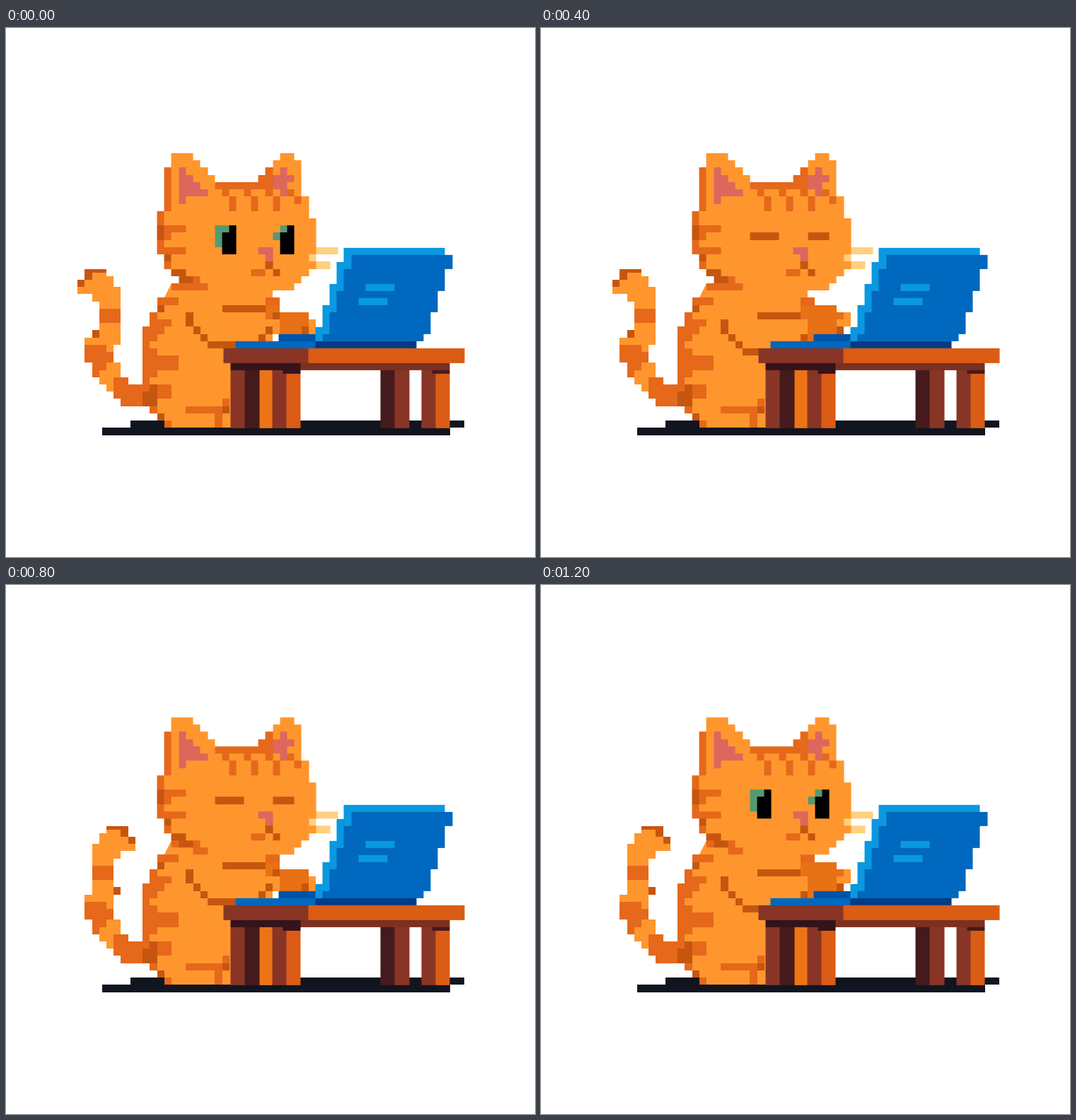
An HTML page that plays this animation: 748x748 px, repeating every 1.6 s.

```html
<!DOCTYPE html>
<html lang="en">
<head>
<meta charset="utf-8">
<title>Cat at a laptop</title>
<style>
  html, body { margin: 0; width: 100%; height: 100%; overflow: hidden; background: #fff; }
  svg { display: block; width: 100vw; height: 100vh; shape-rendering: crispEdges; }
  #tailLeft, #tailRight, #eyesOpen, #eyesShut, #armsUp, #armsDown {
    animation: show 1600ms step-end infinite;
  }
  #head { animation: nod 1600ms step-end infinite; }
  #tailRight { animation-delay: -800ms; }
  #eyesOpen { animation-delay: -400ms; }
  #eyesShut { animation-delay: -1200ms; }
  #armsUp, #armsDown { animation-duration: 800ms; }
  #armsDown { animation-delay: -400ms; }
  @keyframes show { 0% { visibility: visible } 50%, 100% { visibility: hidden } }
  @keyframes nod { 0% { transform: none } 50%, 100% { transform: translateY(1px) } }
</style>
</head>
<body>
<svg viewBox="0 0 748 748">
  <!-- one unit is one square cell of the drawing -->
  <g transform="translate(101.1 177) scale(10.22)">
    <g id="ground"></g>
    <g id="tail"></g>
    <g id="tailLeft"></g>
    <g id="tailRight" transform="translate(8) scale(-1 1)"></g>
    <g id="body"></g>
    <g id="armsUp"></g>
    <g id="armsDown"></g>
    <g id="head">
      <g id="face"></g>
      <g id="eyesOpen"></g>
      <g id="eyesShut"></g>
    </g>
    <g id="laptop" transform="translate(32.87 13.05)"></g>
    <g id="table" transform="translate(20.15 27)"></g>
  </g>
</svg>
<script>
const fur = '#ff962d', stripe = '#e5681b', dark = '#c6560f', paw = '#e87015',
      pink = '#dd675d', green = '#559972', whisker = '#ffd07f',
      blue = '#0068be', sky = '#0a98e0', deep = '#0054a8', navy = '#003c88',
      wood = '#db5c14', brown = '#883526', shade = '#451a1c', dusk = '#35131a';

function draw(id, fill, d) {
  const path = document.createElementNS('http://www.w3.org/2000/svg', 'path');
  path.setAttribute('d', d);
  path.setAttribute('fill', fill);
  document.getElementById(id).append(path);
}
const bar = (x, y, w, h = 1) => `M${x} ${y}h${w}v${h}h${-w}z`;
const steps = (step, n) => step.repeat(n);
const repeat = (n, make) => Array.from({ length: n }, (_, i) => make(i)).join('');

draw('ground', '#111520', bar(7.35, 37, 46.2) + bar(3.4, 38, 48.2));

// Tail: a fixed root and a tip that flips from side to side.
draw('tail', fur, `M1 25.5h4v3.5h1v2h1v1h3v3h-4${steps('v-1h-1', 4)}v-2h-1z`);
draw('tail', stripe, `M1 26.5h3v1h1v1.5${steps('h-1v1', 2)}h-1v-2h-1zM5 31h2v1h3v3h-4v-1h-1z`);
for (const tip of ['tailLeft', 'tailRight']) {
  draw(tip, fur, 'M1 16h3v1h1v1.5h1v8h-3v-6h-1v-1h-2v-2h1z');
  draw(tip, stripe, bar(3, 21.5, 3, 2));
  draw(tip, dark, 'M0 18.5v-1h1v-1.5h3v.5h-2v1h-1v1z' + bar(2, 24.5, 1));
}

// Body and its flank stripes.
draw('body', fur, `M13 18h14v2h1v2h-1v5h-5.8v11h-9.2${steps('v-1h-1', 2)}v-1h-1v-11h1v-2h1v-2h1z`);
draw('body', stripe, `M13 18h3v1h-3v1h1v1h-3v-1h2z${bar(10, 22, 1, 2)}M11 23h2v1h-1v1h-1v1h-1v1h1v1h3v2h-3v1h-1v1h-1v-8h2z
  M9 32h4v2h-2v2h-1v-1h-1z${bar(12, 37, 1)}M15 35h5v3h-1v-2h-4z${bar(20, 34, 1)}${bar(26, 20, 2)}`);
draw('body', dark, `${bar(11, 21, 1)}M10 32h1v3h-2v-2h1z${bar(11, 36, 1)}${bar(20, 35, 1)}`);

// Arms: the same creases, one cell lower on each keystroke.
const creases = y => `M15 ${y}h1v2${steps('h1v1', 2)}h4v1h-4${steps('v-1h-1', 3)}z${bar(20, y - 1, 6)}`;
const elbow = x => bar(x + 1, 24, 1) + bar(x, 25, 1);
draw('armsUp', fur, 'M25 22h2v1h1v2h-1v1h-2zM31 23h2v2h-2z');
draw('armsUp', paw, 'M26 21h2v1h4v2h-1v1h-3v-2h-2z');
draw('armsUp', dark, creases(22) + elbow(25) + bar(27, 22, 1) + bar(31, 24, 1));
draw('armsDown', fur, bar(25, 23, 2, 3) + bar(31, 22, 2, 2));
draw('armsDown', paw, 'M26 21h5v1h1v1h-1v2h-3v1h-1v-3h-1z');
draw('armsDown', dark, creases(23) + bar(26, 25, 1) + bar(31, 24, 1));

// Head.
draw('face', fur, `M13 0h3${steps('v1h1', 3)}v1h6${steps('v-1h1', 3)}v-1h2v1h1v5h1v3h1v7
  ${steps('h-1v1', 3)}H16v-1h-2${steps('v-1h-1', 2)}v-2h-1v-6h1v-6h1z`);
draw('face', stripe, `M19 4h6v-1h1v-1h1v3h-8z${bar(12, 2, 1, 6)}${bar(11, 8, 1, 6)}
  ${repeat(4, i => bar(20 + 3 * i, 5, 1))}${repeat(3, i => bar(21 + 3 * i, 6, 1, 2))}${bar(30, 6, 1)}
  ${bar(12, 10, 3)}${bar(12, 11, 1)}${bar(12, 13, 3)}${bar(12, 15, 1)}${bar(16, 17, 1)}${bar(16, 18, 2)}${bar(24, 16, 2)}`);
draw('face', dark, `${bar(11, 10, 1, 2)}${bar(12, 14, 1)}M13 16h2v1h1v1h-2v-1h-1zM26 15h1v1h1v1h-1v-1h-1z`);
draw('face', pink, `M14 2h1${steps('v1h1', 3)}v1h-3v1h-1zM28 2h1v1h1v1h-1v2h-1v-1h-1v-2h1zM25 13h2v2h-1v-1h-1z`);
draw('face', whisker, bar(33, 13, 3) + bar(32, 14, 1) + bar(33, 15, 2));
draw('eyesOpen', green, 'M19 10h2v1h-1v2h-1zM28 10h1v1h-1v1h-1v-1h1z');
draw('eyesOpen', '#000', repeat(2, i => `M${21 + 8 * i} 10h1v4h-2v-3h1z`));
draw('eyesShut', dark, bar(19, 11, 4) + bar(27, 11, 3));

// Laptop: the lid leans one cell to the left every three rows.
const lean = row => Math.floor(row / 3);
draw('laptop', blue, repeat(12, i => bar(4 - lean(i + 2), i + 1, 15 + lean(i + 2) - lean(i + 1))));
draw('laptop', sky, bar(4, 0, 14) + bar(7, 5, 4) + bar(6, 7, 4) +
  repeat(12, i => bar(4 - lean(i + 2), i + 1, 1 + lean(i + 2) - lean(i + 1))));
draw('laptop', blue, bar(-11.05, 13, 11.05));
draw('laptop', deep, bar(-5, 12, 5));
draw('laptop', navy, bar(0, 13, 14));

// Table: each leg pairs a left and a right face, two cells wide.
const leg = (x, left, right) => {
  draw('table', left, bar(x, 3, 2, 8));
  draw('table', right, bar(x + 2, 3, 2, 8));
};
draw('table', '#ed7414', bar(5, 3, 2, 8));
leg(1, brown, shade);
leg(6.75, brown, wood);
leg(21.75, shade, brown);
leg(27.4, brown, wood);
draw('table', wood, bar(11.75, 0, 21.65, 2));
draw('table', brown, bar(0, 0, 11.75, 2));
draw('table', '#7a3022', bar(10.7, 2, 20.7));
draw('table', dusk, bar(1, 2, 9.7) + bar(8.25, 3, 2.5, .5));
draw('table', shade, bar(28.9, 3, 2.5, .5));
</script>
</body>
</html>
```
